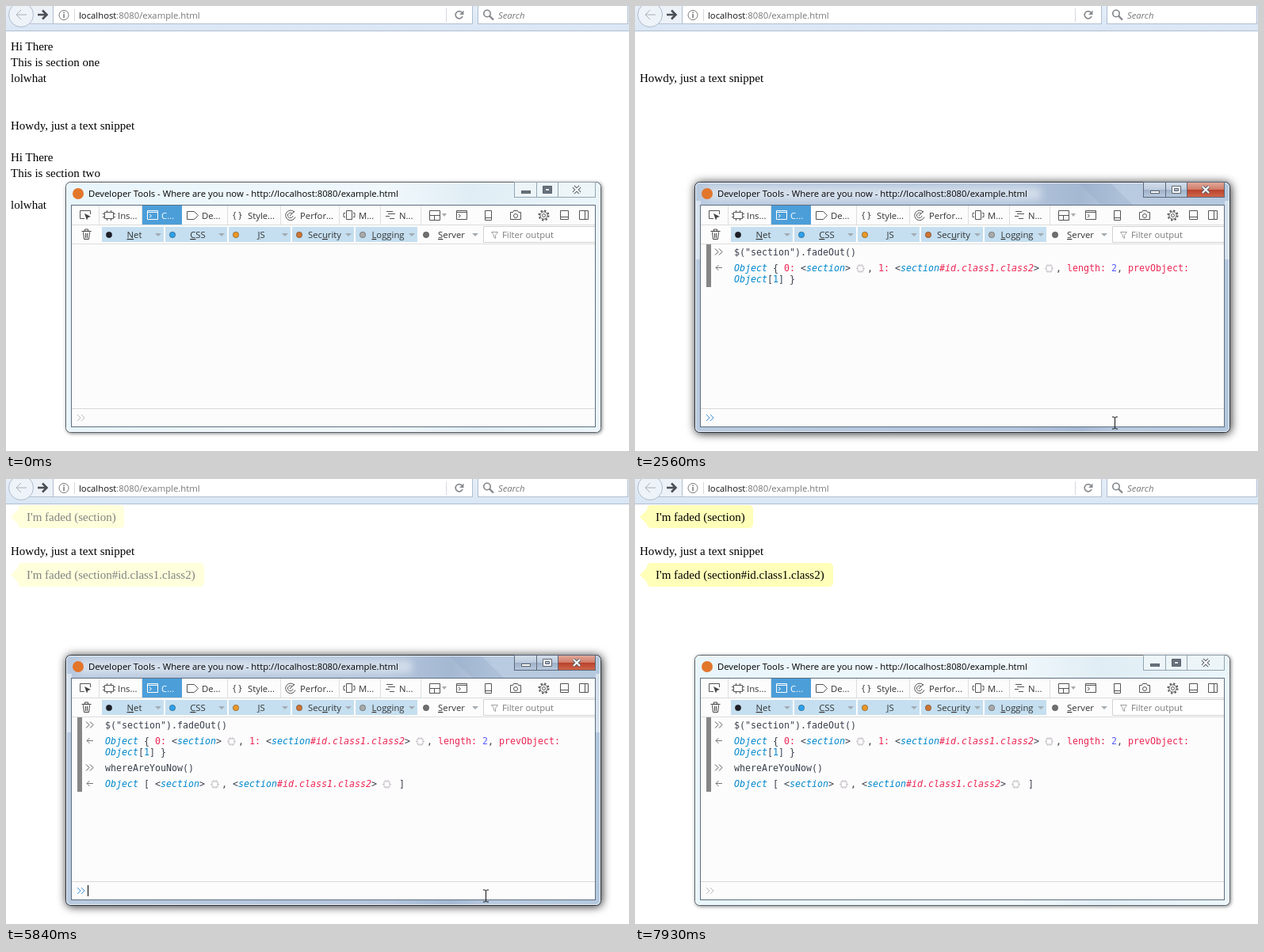
An HTML page for the animation above (8010 ms loop, 786 by 562 pixels).

```html
<!DOCTYPE html>
<html lang="en">
<head>
<meta charset="utf-8">
<title>Console demo</title>
<style>
html, body { margin: 0; width: 100%; height: 100%; overflow: hidden; background: #fff; }
svg { display: block; }
text { white-space: pre; }
.page text { font: 15px "Liberation Serif", serif; }
.ui { font: 11.3px "Open Sans", sans-serif; fill: #333; }
.mono { font: 11.63px "DejaVu Sans Mono", monospace; fill: #393f4c; }
.line { fill: none; stroke: #555; stroke-width: 1; }
.blue { fill: #0088cc; }
.it { font-style: italic; }
.red { fill: #ed2655; }
.num { fill: #5b5fff; }
.mid { text-anchor: middle; }
</style>
</head>
<body>
<svg id="stage" width="786" height="562" viewBox="0 0 786 562"></svg>
<script>
const LOOP = 8010;
const put = (x, y, s, cls = "") =>
  `<text x="${x}" y="${y}" class="${cls}">${s.replace(/</g, "&lt;")}</text>`;
const box = (x, y, w, h, fill, extra = "") =>
  `<rect x="${x}" y="${y}" width="${w}" height="${h}" fill="${fill}" ${extra}/>`;
const line = (d, stroke = "#555", extra = "") =>
  `<path class="line" d="${d}" style="stroke:${stroke}" ${extra}/>`;
const group = (id, body, extra = "") => `<g id="${id}" ${extra}>${body}</g>`;

const defs = `<defs>
  <linearGradient id="bar" x2="0" y2="1"><stop stop-color="#e6eef8"/><stop offset="1" stop-color="#d9e6f4"/></linearGradient>
  <linearGradient id="glass" x2="1" y2="0"><stop stop-color="#b9cadf"/><stop offset=".6" stop-color="#b3c5dc"/>
    <stop offset=".72" stop-color="#a5b8d2"/><stop offset=".8" stop-color="#b9cbe0"/><stop offset="1" stop-color="#b4c8de"/></linearGradient>
  <linearGradient id="pale" x2="1" y2="0"><stop stop-color="#e8f5fa"/><stop offset=".6" stop-color="#f0f8fc"/>
    <stop offset=".76" stop-color="#e0edf4"/><stop offset="1" stop-color="#ebf6fb"/></linearGradient>
  <linearGradient id="close" x2="0" y2="1"><stop stop-color="#e3ab9d"/><stop offset=".48" stop-color="#d07c69"/>
    <stop offset=".5" stop-color="#b8402a"/><stop offset="1" stop-color="#d0684c"/></linearGradient>
  <linearGradient id="knob" x2="0" y2="1"><stop stop-color="#d5dfeb"/><stop offset=".5" stop-color="#bccbdd"/>
    <stop offset=".52" stop-color="#9fb1c8"/><stop offset="1" stop-color="#b9cade"/></linearGradient>
  <filter id="blur" x="-10%" y="-80%" width="120%" height="260%"><feGaussianBlur stdDeviation="5"/></filter>
</defs>`;

function chrome() {
  return box(0, 0, 786, 31, "url(#bar)") + box(0, 31, 786, 1, "#aebfd2") +
    box(30.5, -5, 30, 27.5, "#edf2f8", 'stroke="#b4c2d2"') +
    box(59.5, -5, 529, 27.5, "#fff", 'stroke="#b0bfd0"') +
    box(595.5, -5, 189, 27.5, "#fff", 'stroke="#b0bfd0"') +
    `<circle cx="19" cy="11" r="15.5" fill="#eef3f9" stroke="#aebccc"/>` +
    line("M26 11H14M19 5l-6 6 6 6", "#a9aeb4", 'stroke-width="2.4" style="stroke-width:2.4"') +
    `<path d="M40 11H51M46 5.5l5.5 5.5-5.5 5.5" fill="none" stroke="#4c4f53" stroke-width="2.6"/>` +
    `<circle cx="73" cy="11.5" r="6" class="line" style="stroke:#777"/>` +
    box(72.3, 10, 1.5, 5, "#777") + box(72.3, 7.5, 1.5, 1.6, "#777") +
    line("M86.5 4V19M555.5 3V20", "#d4d9df") +
    `<text x="92" y="16" class="ui" fill="#111"><tspan fill="#111">localhost</tspan><tspan fill="#777">:8080/example.html</tspan></text>` +
    `<path d="M575.5 8.5A4.6 4.6 0 1 0 576 13" fill="none" stroke="#8a8d91" stroke-width="1.7"/>` +
    `<path d="M577.5 5.5v5.5h-5.5z" fill="#8a8d91"/>` +
    `<circle cx="607" cy="9.5" r="4.2" fill="none" stroke="#808488" stroke-width="1.6"/>` +
    `<path d="M610 12.5l5 5" stroke="#808488" stroke-width="2.2"/>` +
    `<text x="621" y="16" class="ui it" style="fill:#777">Search</text>`;
}

function page() {
  const rows = [[56, "Hi There"], [76, "This is section one"], [96, "lolwhat"],
    [196, "Hi There"], [216, "This is section two"], [256, "lolwhat"]];
  const bubble = (y, h, right, label) =>
    `<path d="M6 ${y + 15}L16 ${y + 5}V${y + 25}z" fill="#ffffb9"/>` +
    box(15, y, right - 15, h, "#ffffb9", 'rx="5"') + put(26, y + 20, label);
  return group("sections", rows.map(([y, s]) => put(6, y, s)).join("")) +
    group("howdy", put(6, 96, "Howdy, just a text snippet")) +
    group("bubbles", bubble(33, 29, 149, "I'm faded (section)") +
      bubble(106, 30, 250, "I'm faded (section#id.class1.class2)"));
}

function frame(active) {
  const edge = active ? "#2c3440" : "#56646f";
  const shadow = active ? "1px 1px 6px rgba(0,0,0,.85)" : "1px 1px 2px rgba(0,0,0,.5)";
  const rim = active ? "#6f7f93" : "#93a5b1";
  const mark = active ? "#fff" : "#6b747c";
  let s = box(75.5, 222.5, 675, 316, `url(#${active ? "glass" : "pale"})`,
    `rx="6" stroke="${edge}" style="filter:drop-shadow(${shadow})"`);
  if (active) s += box(77, 246, 6, 74, "#e5edf6", 'opacity=".7"') + box(744, 246, 6, 74, "#e5edf6", 'opacity=".7"') +
    `<path d="M560 224h40l28 27h-40z" fill="#8fa5c4" opacity=".3"/>` +
    box(92, 229, 420, 16, "#fff", 'opacity=".45" filter="url(#blur)"');
  s += box(76.5, 223.5, 673, 314, "none", `rx="5" stroke="#fff" opacity=".75"`);
  const tones = active ? ["url(#knob)", "url(#knob)", "url(#close)"] : Array(3).fill("#edf5f9");
  [[641.5, 28], [669.5, 27], [696.5, 47]].forEach(([x, w], i) =>
    s += box(x, 222.5, w, 19, tones[i], `stroke="${active ? "#5c6879" : rim}"`));
  return s + box(650.5, 233.5, 11, 3, mark, 'stroke="#59636e"') +
    `<path d="M677.5 227.5h11v9h-11zM680.5 230.5h5v3h-5z" fill="${mark}" fill-rule="evenodd" stroke="#59636e"/>` +
    `<path d="M716 228l8 8M724 228l-8 8" stroke="#59636e" stroke-width="4"/>` +
    `<path d="M716 228l8 8M724 228l-8 8" stroke="#fff" stroke-width="2"/>`;
}

function toolbar() {
  let s = box(82.5, 251.5, 661, 280, "#fcfcfc", 'stroke="#5f6f80"') +
    box(83, 276, 660, 1, "#dcdcdc") + box(83, 300, 660, 1, "#dcdcdc") + box(83, 508, 660, 1, "#d9d9d9") +
    box(172, 252, 50, 24, "#4c9ed9");
  for (const x of [117, 171, 279, 346, 420, 472, 523]) s += box(x, 252, 1, 24, "#dedede");
  const tabs = [[141, "Ins..."], [247, "De..."], [305, "Style..."], [371, "Perfor..."], [445, "M..."], [496, "N..."]];
  s += tabs.map(([x, n]) => put(x, 269, n, "ui")).join("") +
    `<text x="196" y="269" class="ui" style="fill:#fff">C...</text>` + put(286, 268, "{ }", "ui");
  const terminal = (x, c) => line(`M${x}.5 258.5h13v11h-13zM${x} 260.5h13M${x + 3} 263l2.5 2-2.5 2`, c);
  s += terminal(178, "#fff") + terminal(568, "#555") + line(
    "M99 268.5H93.5V258.5H106.5V263" +
    "M124.5 260.5h11v8h-11zM127.5 258v2M132.5 258v2M127.5 269v2M132.5 269v2M122 262.5h2M122 266.5h2M136 262.5h2M136 266.5h2" +
    "M228.5 259.5h9l5 5-5 5h-9z" +
    "M364 260.5a6.3 6.3 0 1 0 1 6M361 262a3.3 3.3 0 1 0 1 3M358 265l6-6" +
    "M429.5 258.5h7v11h-7zM428 261.5h-2v5h2M438 261.5h2v5h-2" +
    "M480 259.5h8M482 262.5h9M479 265.5h5M484 268.5h6" +
    "M534.5 258.5h13v12h-13zM534 264.5h13M540.5 265v6" +
    "M604.5 258.5h8v12h-8zM605 267.5h8" +
    "M636.5 260.5h3l1-2h5l1 2h3v9h-13z" +
    "M699.5 258.5h10v11h-10zM700 266.5h10" +
    "M723.5 258.5h11v11h-11zM730.5 259v10") +
    `<path d="M99 262l8 4-3.5 1-1.5 3.5z" fill="#444"/><path d="M550 262h6l-3 4z" fill="#aaa"/>` +
    `<circle cx="643" cy="265" r="2.5" class="line"/>` +
    `<circle cx="678.5" cy="264.5" r="2" class="line"/><circle cx="678.5" cy="264.5" r="4.6" class="line"/>` +
    `<circle cx="678.5" cy="264.5" r="6" fill="none" stroke="#555" stroke-width="2" stroke-dasharray="2.2 2.51"/>` +
    line("M97.5 285.5l1 9h6l1-9M95.5 284.5h12M99.5 284v-2h4v2M100.5 287v6M102.5 287v6", "#444");
  const filters = [["", "N", "et", "#1f1f28"], ["", "C", "SS", "#2fa0ea"], ["", "J", "S", "#eb9726"],
    ["Sec", "u", "rity", "#cd7332"], ["", "L", "ogging", "#a9a9a9"], ["", "S", "erver", "#707070"]];
  filters.forEach(([pre, key, post, color], i) => {
    const x = 121 + 80 * i;
    if (i < 5) s += box(x, 279, 78, 19, "#c5dff0");
    s += `<circle cx="${x + 9}" cy="289" r="3.7" fill="${color}" stroke="#000" stroke-opacity=".3"/>` +
      `<text x="${x + 41}" y="293" class="ui mid">${pre}<tspan text-decoration="underline">${key}</tspan>${post}</text>` +
      `<path d="M${x + 67} 287h8l-4 4z" fill="#a3abb1"/>`;
  });
  return s + box(602, 278, 141, 21, "#fff") + line("M743 278.5H602.5V298.5H743", "#d2d2d2") +
    line("M612.5 285.5h8l-3 4v4l-2-1.5v-2.5z", "#a0a0a0") +
    `<text x="626" y="293" class="ui" style="fill:#7c7c7c">Filter output</text>`;
}

const node = (x, y) => line(
  `M${x - 3.5} ${y - 3.5}h7v7h-7zM${x - 1.5} ${y - 5.5}v2M${x + 1.5} ${y - 5.5}v2M${x - 1.5} ${y + 3.5}v2M${x + 1.5} ${y + 3.5}v2` +
  `M${x - 5.5} ${y}h2M${x + 3.5} ${y}h2`, "#c2bcc4");
const chevrons = (x, y, c) => line(`M${x} ${y - 4}l4 4-4 4M${x + 5} ${y - 4}l4 4-4 4`, c, 'stroke-width="1.5"');
const back = y => line(`M110 ${y}h-8M105.5 ${y - 3.5}l-3.5 3.5 3.5 3.5`, "#777");
const tag = (x, y, rest = "") =>
  `<text x="${x}" y="${y}" class="mono it">&lt;<tspan class="blue">section</tspan><tspan class="red">${rest}</tspan>&gt;</text>`;

function output() {
  const obj = y => put(125, y, "Object", "mono it blue");
  const id = "#id.class1.class2";
  const first = box(90, 301, 6, 54, "#868686") + chevrons(101, 310.5, "#555") + back(330.5) +
    put(125, 315, '$("section").fadeOut()', "mono") +
    obj(335) + put(174, 335, "{", "mono") + put(188, 335, "0:", "mono red") + tag(209, 335) + node(284.5, 331.5) +
    put(293, 335, ",", "mono") + put(307, 335, "1:", "mono red") + tag(328, 335, id) + node(522.5, 331.5) +
    put(531, 335, ",", "mono") + put(545, 335, "length:", "mono red") + put(601, 335, "2", "mono num") +
    put(608, 335, ",", "mono") + put(622, 335, "prevObject:", "mono red") +
    obj(349) + `<text x="167" y="349" class="mono">[<tspan class="blue">1</tspan>] }</text>`;
  const second = box(90, 355, 6, 40, "#868686") + chevrons(101, 364.5, "#555") + back(384.5) +
    put(125, 369, "whereAreYouNow()", "mono") +
    obj(389) + put(174, 389, "[", "mono") + tag(188, 389) + node(263.5, 385.5) + put(272, 389, ",", "mono") +
    tag(286, 389, id) + node(480.5, 385.5) + put(496, 389, "]", "mono");
  return group("first", first) + group("second", second);
}

function popup() {
  return box(99.5, 455.5, 124, 53, "#fff", 'stroke="#b5b9bd"') + box(101, 490, 122, 17, "#4c9ed9") +
    put(106, 468, "window", "mono") + put(106, 485, "whereAreYouNow", "mono") +
    `<text x="106" y="502" class="mono" style="fill:#fff">watch</text>`;
}

const stage = document.getElementById("stage");
stage.innerHTML = defs + box(0, 0, 786, 562, "#fff") + group("page", page(), 'class="page"') + chrome() +
  group("idle", frame(false)) + group("active", frame(true)) +
  `<circle cx="91" cy="237" r="7" fill="#e2762b"/>` +
  `<text x="104" y="241" class="ui" style="fill:#000">Developer Tools - Where are you now - http://localhost:8080/example.html</text>` +
  toolbar() + output() +
  group("dim", chevrons(90, 520, "#bcbcbc")) + group("lit", chevrons(90, 520, "#3f8fd8")) +
  `<text x="103" y="524" class="mono"><tspan id="typed"></tspan><tspan id="ghost" fill="#a0a3a7"></tspan></text>` +
  group("popup", popup()) + `<rect id="caret" y="513" width="1" height="14" fill="#000"/>` +
  group("beam", line("M-3.5 -7.5h2.5l1 1 1-1h2.5M0 -6.5v13M-3.5 7.5h2.5l1-1 1 1h2.5", "#111"));

const $ = Object.fromEntries([...stage.querySelectorAll("[id]")].map(e => [e.id, e]));
const CALL = "whereAreYouNow";
const typing = [[0, ""], [1400, '$("section").fadeOut()'], [2100, ""], [2950, "w"], [3110, "wh"], [3260, "whe"],
  [3350, "wher"], [3430, "where"], [3730, CALL], [4590, CALL + "("], [4820, CALL + "()"], [5520, ""]];
const blinks = [1010, 1930, 2100, 2560, 2950, 4200, 4590, 5350, 5520, 6070, 6530, 6990, 7550, 7930];
const pointer = [[0], [380, 629, 537], [460, 617, 531], [530, 608, 525], [610, 605.5, 526.5],
  [6830, 622, 534], [6910, 658, 546], [6990, 703, 559], [7080]];

const latest = (list, t) => list.filter(e => e[0] <= t).pop();
const show = (el, on) => { el.style.display = on ? "" : "none"; };
const swing = p => .5 - Math.cos(Math.PI * Math.min(1, Math.max(0, p))) / 2;
const held = (t, start, step) => Math.floor((t - start) / step + 1e-6) * step;

function draw(t) {
  const focus = t >= 930 && t < 7930;
  show($.active, focus);
  show($.idle, !focus);
  const prompt = t >= 1010 && t < 7930;
  show($.lit, prompt);
  show($.dim, !prompt);

  show($.sections, t < 2560);
  $.sections.style.opacity = 1 - swing(held(t, 2100, 460 / 6) / 400);
  $.howdy.setAttribute("transform", `translate(0 ${t < 2560 ? 60 : 0})`);
  $.bubbles.style.opacity = swing((held(t, 5520, 78.75) - 20) / 600);
  show($.first, t >= 2100);
  show($.second, t >= 5520);

  const text = latest(typing, t)[1];
  $.typed.textContent = text;
  const hint = t < 3110 ? "watch" : CALL;
  $.ghost.textContent = t >= 2950 && t < 3730 ? hint.slice(text.length) : "";
  show($.popup, t >= 2950 && t < 3110);
  show($.caret, blinks.filter(b => b <= t).length % 2);
  $.caret.setAttribute("x", 103 + 7 * text.length);

  const [, x, y] = latest(pointer, t);
  show($.beam, x);
  if (x) $.beam.setAttribute("transform", `translate(${x} ${y})`);
}

const begin = performance.now();
function tick() {
  draw((performance.now() - begin) % LOOP);
  requestAnimationFrame(tick);
}
tick();
</script>
</body>
</html>
```
